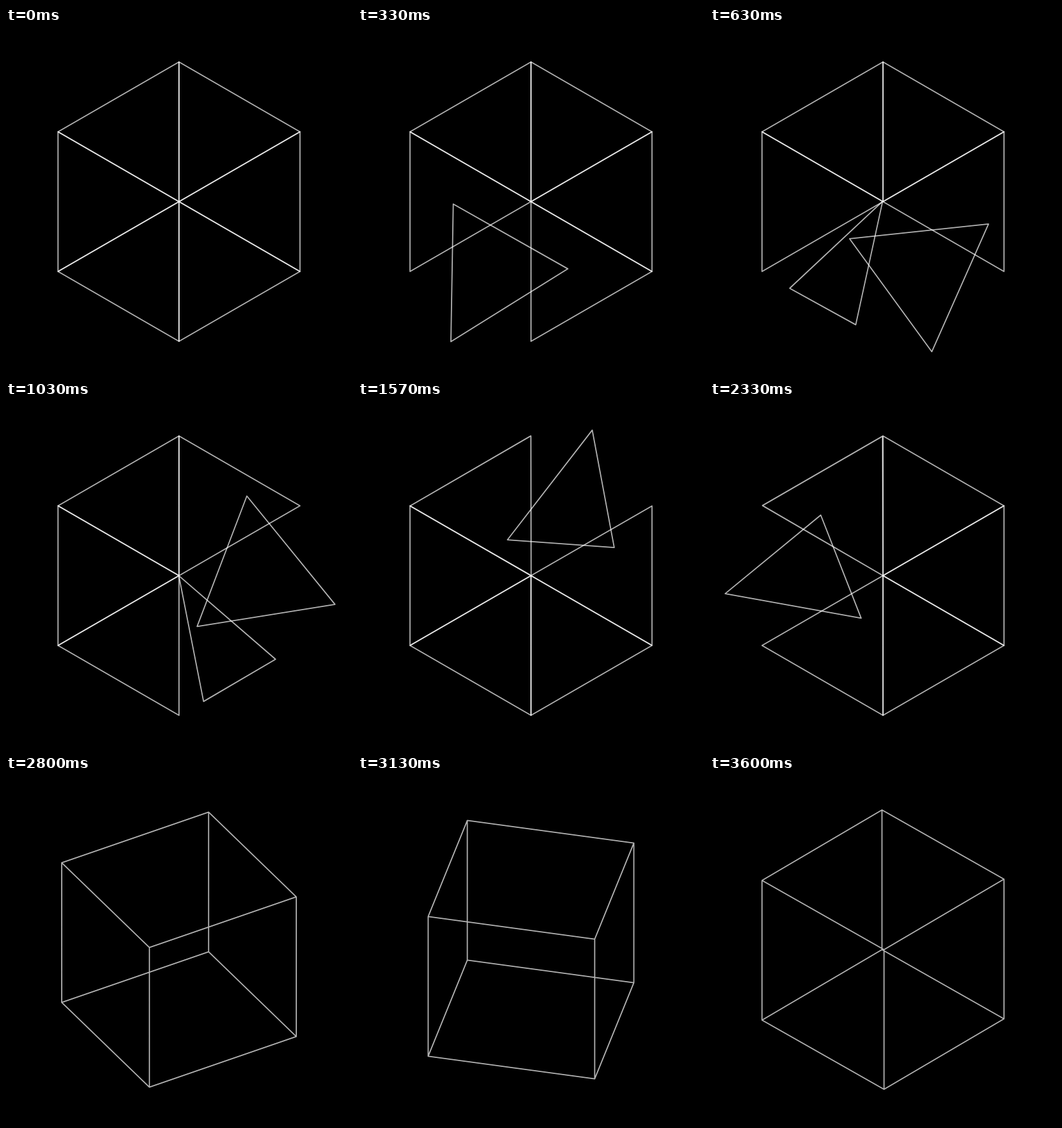
Write an HTML page with a canvas that moves like this. It is 540 px wide and 540 px high and loops after 3.63 s.

```html
<!DOCTYPE html>
<html lang="en">
<head>
<meta charset="utf-8">
<title>Hexagon to cube</title>
<style>
  html, body { margin: 0; width: 100%; height: 100%; overflow: hidden; background: #000; }
  canvas { display: block; }
</style>
</head>
<body>
<canvas width="540" height="540"></canvas>
<script>
const ctx = document.querySelector('canvas').getContext('2d');
const { PI, sin, cos, sqrt } = Math;
const LOOP = 3630, STEPS = 109;   // loop length in ms, pictures per loop
const CX = 270, CY = 271, R = 218;
const r = R / sqrt(3);            // circumradius of one triangle

// Timing in picture steps
const STAGGER = 11.65, SPIN = 19.9;
const FLIP_START = 8.3, FLIP = 15.7;
const CUBE_START = 81.1, CUBE = 28.8;

const unit = x => Math.min(1, Math.max(0, x));

function strokePath() {
  ctx.setTransform(1, 0, 0, 1, 0, 0);
  ctx.stroke();
}

// Turns a third of a circle about its centroid, then flips over its radial axis
function drawTriangle(k, time) {
  const spin = PI / 3 * (1 - cos(PI * unit(time / SPIN)));
  const flip = PI * unit((time - FLIP_START) / FLIP);
  ctx.translate(CX, CY);
  ctx.rotate((2 - k) * PI / 3);
  ctx.translate(r, 0);
  ctx.scale(1, cos(flip));
  ctx.rotate(-spin);
  ctx.beginPath();
  for (let i = 0; i < 3; i++) {
    const a = PI + i * 2 * PI / 3;
    ctx.lineTo(r * cos(a), r * sin(a));
  }
  ctx.closePath();
  strokePath();
}

// Isometric wireframe turning about its vertical axis
function drawCube(angle) {
  ctx.translate(CX, CY);
  ctx.beginPath();
  const corners = [0, 1, 2, 3].map(i => {
    const a = angle + i * PI / 2;
    return [R * sqrt(3) / 2 * cos(a), R / 2 * sin(a)];
  });
  for (const h of [-R / 2, R / 2]) {
    corners.forEach(([x, y], i) => i ? ctx.lineTo(x, y + h) : ctx.moveTo(x, y + h));
    ctx.closePath();
  }
  for (const [x, y] of corners) {
    ctx.moveTo(x, y - R / 2);
    ctx.lineTo(x, y + R / 2);
  }
  strokePath();
}

function draw(step) {
  ctx.fillStyle = '#000';
  ctx.fillRect(0, 0, 540, 540);
  ctx.strokeStyle = 'rgba(255, 255, 255, .7)';
  ctx.lineWidth = 1.8;
  ctx.lineJoin = 'round';
  if (step < CUBE_START) {
    for (let k = 0; k < 6; k++) drawTriangle(k, step - k * STAGGER);
  } else {
    drawCube(PI / 2 * sin(PI / 2 * unit((step - CUBE_START) / CUBE)));
  }
}

const start = performance.now();
function tick() {
  const t = (performance.now() - start) % LOOP;
  draw(Math.floor((t + 4) / LOOP * STEPS) % STEPS);
  requestAnimationFrame(tick);
}
tick();
</script>
</body>
</html>
```
